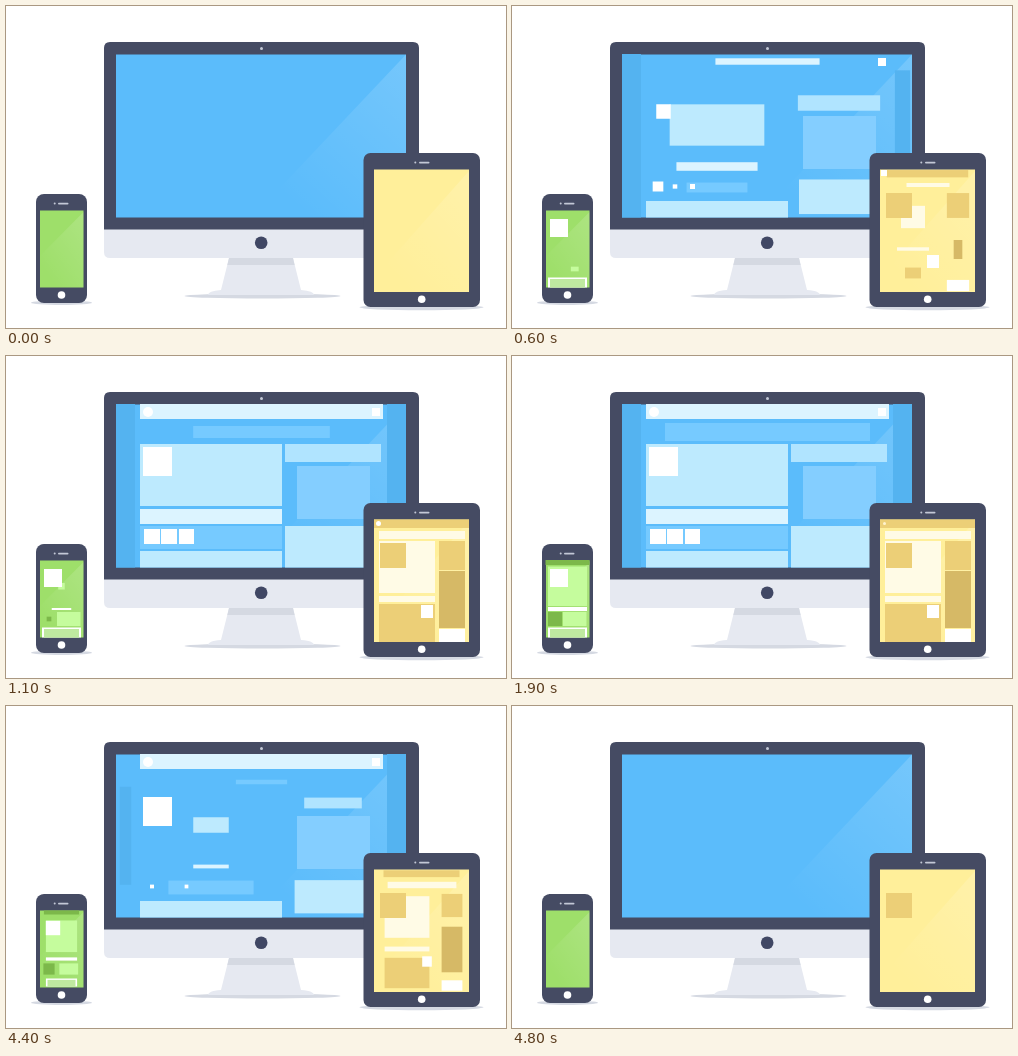
An HTML page that plays this animation: 500x322 px, repeating every 4.9 s.

```html
<!DOCTYPE html>
<html lang="en">
<head>
<meta charset="utf-8">
<title>Responsive layouts</title>
<style>
  html, body { margin: 0; width: 100%; height: 100%; overflow: hidden; background: #fff; }
  svg { display: block; width: 100%; height: 100%; }
</style>
</head>
<body>
<svg viewBox="0 0 500 322">
  <defs>
    <linearGradient id="gloss" x1="1" y1="0" x2="0.25" y2="0.9">
      <stop offset="0" stop-color="#fff" stop-opacity=".16"/>
      <stop offset="1" stop-color="#fff" stop-opacity="0"/>
    </linearGradient>
  </defs>

  <!-- monitor -->
  <ellipse cx="256.5" cy="290" rx="78" ry="2.5" fill="#d5d9e2"/>
  <path d="M223 252H287L295 284Q308 285 308 289H202Q202 285 215 284Z" fill="#e6e9f1"/>
  <path d="M223 252H287L288.6 259H221.3Z" fill="#d5d9e2"/>
  <path d="M98 223H413V246Q413 252 407 252H104Q98 252 98 246Z" fill="#e6e9f1"/>
  <path d="M98 223.5V42Q98 36 104 36H407Q413 36 413 42V223.5Z" fill="#454b63"/>
  <circle cx="255.5" cy="42.5" r="1.5" fill="#c3c8d6"/>
  <circle cx="255.2" cy="236.8" r="6.3" fill="#404764"/>
  <rect x="110" y="48.5" width="290" height="163" fill="#5bbcfb"/>
  <path d="M400 48.5V211.5H246Z" fill="url(#gloss)"/>
  <g id="monitor"></g>

  <!-- tablet -->
  <ellipse cx="415.5" cy="301.3" rx="62" ry="3" fill="#d5d9e2"/>
  <rect x="357.5" y="147" width="116.5" height="154" rx="7" fill="#454b63"/>
  <circle cx="409.3" cy="156.5" r="1" fill="#c3c8d6"/>
  <rect x="413" y="155.7" width="10.5" height="1.8" rx=".9" fill="#c3c8d6"/>
  <circle cx="415.7" cy="293.3" r="3.8" fill="#fff"/>
  <rect x="368" y="163.5" width="95" height="122.5" fill="#ffef9a"/>
  <path d="M463 165V286H368V272Z" fill="url(#gloss)"/>
  <g id="tablet"></g>

  <!-- phone -->
  <ellipse cx="55.5" cy="296.7" rx="30.5" ry="2.2" fill="#d5d9e2"/>
  <rect x="30" y="188" width="51" height="109" rx="8" fill="#454b63"/>
  <circle cx="48.7" cy="197.5" r="1" fill="#c3c8d6"/>
  <rect x="52" y="196.7" width="10.5" height="1.8" rx=".9" fill="#c3c8d6"/>
  <circle cx="55.5" cy="289" r="3.8" fill="#fff"/>
  <rect x="34" y="204.5" width="43.5" height="77" fill="#9edf6a"/>
  <path d="M77.500 206V281.500H34V250Z" fill="url(#gloss)"/>
  <g id="phone"></g>
</svg>
<script>
const LOOP = 4900, STEP = 100;
const parts = [];

// Times are in steps: a block grows over `grow` and shrinks over `shrink`.
function block(device, color, [x1, y1, x2, y2], grow, shrink, round = 0) {
  const node = document.createElementNS('http://www.w3.org/2000/svg', 'rect');
  node.setAttribute('fill', color);
  document.getElementById(device).append(node);
  parts.push({ node, cx: (x1 + x2) / 2, cy: (y1 + y2) / 2, w: x2 - x1, h: y2 - y1, grow, shrink, round });
}
const monitor = (...args) => block('monitor', ...args);
const tablet = (color, box, grow, shrink = [43, 48], round) => block('tablet', color, box, grow, shrink, round);
const phone = (color, box, grow) => block('phone', color, box, grow, [43, 48]);

const white = '#fff', deep = '#54b3f0', sky = '#76caff', pale = '#bdeafe', ice = '#dcf4ff';
const early = [0, 6], late = [44, 48];

monitor(deep, [110, 48, 129, 211.5], early, [42, 47]);
monitor(deep, [381, 48, 400, 211.5], [2, 7], late);
monitor(ice, [134, 48, 377, 63], [3, 10], late);
monitor(white, [137, 51, 147, 61], [6, 11], late, 0.5);
monitor(white, [366, 52, 374, 60], early, late);
monitor(sky, [153, 67, 358, 85], [7, 13], [41, 45]);
monitor(pale, [134, 88, 276, 150], [2, 8], [41, 45]);
monitor(white, [137, 91, 166, 120], [3, 9], late);
monitor(ice, [134, 153, 276, 168], [2, 9], [41, 45]);
monitor(sky, [134, 170, 276, 193], [3, 10], [42, 47]);
monitor(white, [138, 173, 154, 188], [2, 8], [41, 45]);
monitor(white, [155, 173, 171, 188], [4, 11], [40, 44]);
monitor(white, [173, 173, 188, 188], [4, 10], [41, 45]);
monitor(pale, [134, 195, 276, 211.5], early, late);
monitor('#b0e4ff', [279, 88, 375, 106], [0, 7], [42, 47]);
monitor('#84ceff', [291, 110, 364, 163], early, late);
monitor(pale, [279, 170, 375, 211.5], [1, 7], [43, 48]);

const sand = '#eccf77', cream = '#fffbe6';

tablet(sand, [368, 163.5, 463, 172], [0, 7]);
tablet(white, [369, 164, 375, 170], early, [6, 10]);
tablet(white, [370, 165, 375, 170], [6, 11], [18, 19], 0.5);
tablet('#fff3cf', [371, 166, 374, 169], [18, 19], [40, 43], 0.5);
tablet(cream, [373, 175, 459, 183], [3, 9]);
tablet(cream, [373, 185, 429, 237], [3, 10]);
tablet(sand, [374, 187, 400, 212], early, [48, 49]);
tablet(sand, [433, 185, 459, 214], [0, 7]);
tablet('#d6b966', [433, 215, 459, 272], [4, 10]);
tablet(white, [433, 273, 459, 286], [0, 7]);
tablet(cream, [373, 240, 429, 246], [2, 9]);
tablet(sand, [373, 248, 429, 286], [4, 11]);
tablet(white, [415, 249, 427, 262], early);

const leaf = '#7cb84a', mint = '#c5fc9d';

phone(leaf, [33.5, 204, 77.5, 209], [13, 19]);
phone(mint, [36, 210.5, 75, 250], [10, 16]);
phone(white, [38, 213, 56, 231], early);
phone(white, [36, 251, 75, 255], [8, 14]);
phone(leaf, [36, 256, 50, 270], [9, 15]);
phone(mint, [51, 256, 74.5, 270], [4, 10]);
phone(white, [36, 271.5, 75, 281.5], early);
phone('#bfe9a0', [38, 273, 73, 281.5], early);

const clamp = v => Math.max(0, Math.min(1, v));
const progress = (step, [from, to]) => clamp((step - from) / (to - from));

function draw(time) {
  const step = Math.floor((time % LOOP) / STEP);
  for (const { node, cx, cy, w, h, grow, shrink, round } of parts) {
    const scale = Math.min(progress(step, grow), 1 - progress(step, shrink));
    const width = w * scale, height = h * scale;
    node.setAttribute('x', cx - width / 2);
    node.setAttribute('y', cy - height / 2);
    node.setAttribute('width', width);
    node.setAttribute('height', height);
    node.setAttribute('rx', width * round);
  }
}

const start = performance.now();
function tick() {
  draw(performance.now() - start);
  requestAnimationFrame(tick);
}
tick();
</script>
</body>
</html>
```
